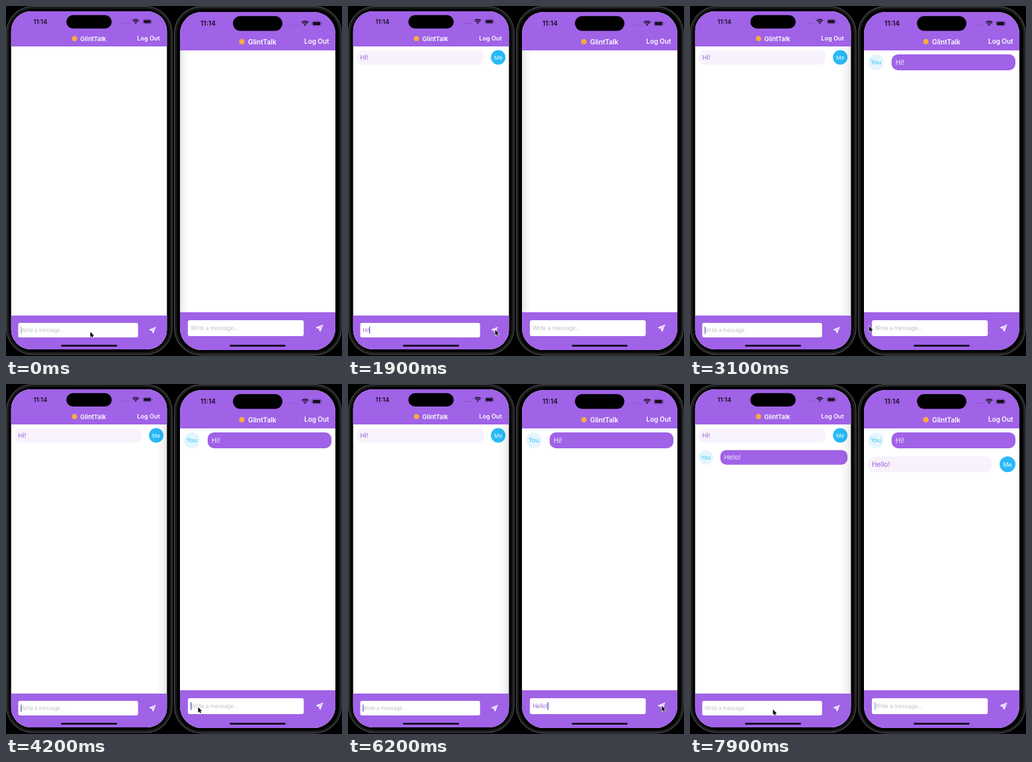
These frames come from a looping animation (508x528 px, 8000 ms). An HTML page with a canvas:

```html
<!DOCTYPE html>
<html lang="en">
<head>
<meta charset="utf-8">
<title>Two phones chatting</title>
<style>
  html, body { margin: 0; width: 100%; height: 100%; overflow: hidden; background: #000; }
  canvas { display: block; width: 508px; height: 528px; }
</style>
</head>
<body>
<canvas id="stage" width="508" height="528"></canvas>
<script>
const ctx = document.getElementById('stage').getContext('2d');
const LOOP = 8000, STEP = 100;
const FONT = 'Inter, "Open Sans", sans-serif';
const PURPLE = '#a062e7', INK = '#9a5edc', BLUE = '#29b9f7';
const APP_NAME = 'GlintTalk';

// Screen position in stage pixels; w is the screen width in points, s pixels per point.
const LEFT = {
  x: 7.5, y: 8, h: 510, w: 430, s: 0.549, head: 61, bar: 467, clockX: 52, statusY: 23.5, batteryX: 214,
  logoutGap: 20, frame: [0.7, 0.7, 250.3, 525]
};
const RIGHT = {
  x: 263, y: 9, h: 510, w: 393, s: 0.598, head: 67, bar: 462, clockX: 305.5, statusY: 26.5, batteryX: 470,
  logoutGap: 16, frame: [254.7, 1, 252.3, 525.5]
};

// Pointer stops: time, x, y
const POINTER = [
  [0, 127, 491], [800, 127, 491], [1100, 264, 477], [1200, 264, 478],
  [1600, 222, 488], [2300, 222, 488], [2600, 245, 485], [3000, 268, 482],
  [3500, 290, 487], [5400, 290, 487], [5600, 393, 482], [6000, 474, 485],
  [7000, 474, 485], [7300, 405, 488], [7700, 135, 491], [7900, 125, 490.5]
];

function box(x, y, w, h, r, fill) {
  ctx.beginPath();
  ctx.roundRect(x, y, w, h, r);
  ctx.fillStyle = fill;
  ctx.fill();
}

function disc(x, y, r, fill) {
  ctx.beginPath();
  ctx.arc(x, y, r, 0, 7);
  ctx.fillStyle = fill;
  ctx.fill();
}

function poly(points, fill) {
  ctx.beginPath();
  points.forEach(([x, y]) => ctx.lineTo(x, y));
  ctx.closePath();
  ctx.fillStyle = fill;
  ctx.fill();
}

function label(str, x, y, size, fill, align = 'left', weight = 400) {
  ctx.font = `${weight} ${size}px ${FONT}`;
  ctx.textAlign = align;
  ctx.textBaseline = 'alphabetic';
  ctx.fillStyle = fill;
  ctx.fillText(str, x, y + size * 0.36);
  return ctx.measureText(str).width;
}

function typed(str, times, t) {
  return str.slice(0, times.filter(k => t >= k).length);
}

// Opacity of a blinking caret
function blink(t, on) {
  const p = t % 1000;
  return p < on ? 1 : p < on + 100 ? 0.5 : 0;
}

function pointerAt(t) {
  const i = POINTER.findIndex(k => k[0] > t);
  if (i < 0) return POINTER[POINTER.length - 1].slice(1);
  const [t0, x0, y0] = POINTER[i - 1], [t1, x1, y1] = POINTER[i];
  const u = (t - t0) / (t1 - t0), e = u * u * (3 - 2 * u);
  return [x0 + (x1 - x0) * e, y0 + (y1 - y0) * e];
}

function drawFrame([x, y, w, h]) {
  box(x, y, w, h, 40, '#18181a');
  ctx.strokeStyle = '#454548';
  ctx.lineWidth = 1.3;
  ctx.stroke();
  box(x + 3, y + 3, w - 6, h - 6, 37, '#000');
  ctx.strokeStyle = '#29292c';
  ctx.lineWidth = 0.7;
  ctx.stroke();
}

function drawStatus(p) {
  const black = '#17101f';
  label('11:14', p.clockX, p.statusY + 0.3, 17 * p.s, black, 'center', 600);
  const k = p.s / 0.57, x = p.batteryX, y = p.statusY;
  for (let i = 0; i < 4; i++) disc(x - 38 + i * 3.4, y + 2.7, 0.8, '#7745b4');

  ctx.strokeStyle = black;
  ctx.lineWidth = 1.5 * k;
  for (const r of [6.7, 4.2]) {
    ctx.beginPath();
    ctx.arc(x - 17.8, y + 3.2, r * k, -Math.PI * 0.76, -Math.PI * 0.24);
    ctx.stroke();
  }
  ctx.beginPath();
  ctx.moveTo(x - 17.8, y + 3.4);
  ctx.arc(x - 17.8, y + 3.4, 2.4 * k, -Math.PI * 0.76, -Math.PI * 0.24);
  ctx.fillStyle = black;
  ctx.fill();

  ctx.beginPath();
  ctx.roundRect(x - 7 * k, y - 3.4 * k, 13 * k, 6.8 * k, 2);
  ctx.strokeStyle = '#64409a';
  ctx.lineWidth = 0.7;
  ctx.stroke();
  box(x - 5.9 * k, y - 2.4 * k, 10.8 * k, 4.8 * k, 1.2, black);
  box(x + 6.8 * k, y - 1.2, 0.8, 2.4, 0.4, '#64409a');
}

function drawMessage(m, row, w) {
  const y = 30 + row * 60.5;
  if (m.mine) {
    box(10, y - 20, w - 80, 40, 16, '#f7f2fb');
    label(m.text, 20, y, 17, INK);
    disc(w - 30, y, 20, BLUE);
    label('Me', w - 30, y + 0.5, 15, '#eefaff', 'center');
  } else {
    disc(30, y, 20, '#e4f5fd');
    label('You', 30, y + 0.5, 15, '#2cc1f6', 'center');
    box(70, y - 20, w - 80, 40, 16, PURPLE);
    label(m.text, 80, y, 17, '#f8f0ff');
  }
}

function drawComposer(w, text, caret) {
  box(20, 20, w - 100, 40, 5, '#fff');
  let end = 0;
  if (text) end = label(text, 27, 40, 14, INK);
  else label('Write a message...', 27, 40, 13.8, '#c1c0c4');
  if (caret) {
    ctx.globalAlpha = caret;
    box(27 + end, 30, 2, 20, 1, '#5142c4');
    ctx.globalAlpha = 1;
  }
  ctx.save();
  ctx.translate(w - 40, 40);
  poly([[9.5, -9.5], [-10, -1.5], [-2.6, 2.4], [1.8, 10]], '#f6eeff');
  ctx.beginPath();
  ctx.moveTo(-2.8, 2.8);
  ctx.lineTo(5.5, -5.5);
  ctx.strokeStyle = PURPLE;
  ctx.lineWidth = 1.4;
  ctx.stroke();
  ctx.restore();
}

// Soft shadow cast by the neighbouring window, from edge x towards x + dx
function drawShadow(p, x, dx) {
  const g = ctx.createLinearGradient(x, 0, x + dx, 0);
  g.addColorStop(0, 'rgba(0,0,0,0.11)');
  g.addColorStop(0.4, 'rgba(0,0,0,0.04)');
  g.addColorStop(1, 'rgba(0,0,0,0)');
  ctx.fillStyle = g;
  ctx.fillRect(Math.min(x, x + dx), p.head, Math.abs(dx), p.bar - p.head);
}

function inPoints(p, y, draw) {
  ctx.save();
  ctx.translate(p.x, y);
  ctx.scale(p.s, p.s);
  draw();
  ctx.restore();
}

function drawPhone(p, state) {
  const pw = p.w * p.s, mid = p.w / 2;
  drawFrame(p.frame);
  ctx.save();
  ctx.beginPath();
  ctx.roundRect(p.x, p.y, pw, p.h, 55 * p.s);
  ctx.clip();
  ctx.fillStyle = '#fff';
  ctx.fillRect(p.x, p.y, pw, p.h);
  ctx.fillStyle = PURPLE;
  ctx.fillRect(p.x, p.y, pw, p.head - p.y);
  ctx.fillRect(p.x, p.bar, pw, p.y + p.h - p.bar);

  inPoints(p, p.y, () => {
    box(mid - 62.5, 10.5, 125, 37, 18.5, '#000');
    disc(mid - 40, 75, 7, '#f8ad3c');
    label(APP_NAME, mid + 11.5, 75, 17, '#fff', 'center', 600);
    label('Log Out', p.w - p.logoutGap, 75, 16.5, '#fff', 'right', 600);
  });
  drawStatus(p);
  inPoints(p, p.head, () => state.messages.forEach((m, i) => drawMessage(m, i, p.w)));
  inPoints(p, p.bar, () => drawComposer(p.w, state.text, state.caret));
  box(p.x + pw * 0.32, 511, pw * 0.36, 2.9, 1.45, '#1c0f2c');
  if (state.shadow) drawShadow(p, state.shadow > 0 ? p.x : p.x + pw, state.shadow);
  ctx.restore();
}

function drawPointer(x, y) {
  const arrow = [[0, 0], [0, 8], [1.8, 6.5], [3, 9.2], [4.3, 8.6], [3.2, 6], [5.6, 5.8]];
  ctx.save();
  ctx.translate(x + 0.5, y + 0.5);
  poly(arrow, '#000');
  ctx.strokeStyle = '#fff';
  ctx.lineWidth = 1.2;
  ctx.lineJoin = 'round';
  ctx.stroke();
  poly(arrow, '#000');
  ctx.restore();
}

function messagesAt(t, isLeft, hiAt, helloAt) {
  const list = [];
  if (t >= hiAt) list.push({ text: 'Hi!', mine: isLeft });
  if (t >= helloAt) list.push({ text: 'Hello!', mine: !isLeft });
  return list;
}

function render(t) {
  ctx.fillStyle = '#000';
  ctx.fillRect(0, 0, 508, 528);
  const rightFocused = t >= 3000;
  drawPhone(LEFT, {
    messages: messagesAt(t, true, 1900, 7100),
    text: t < 2200 ? typed('Hi!', [500, 900, 1000], t) : '',
    caret: t < 500 ? 0.5 : t < 2200 ? 1 : blink(t, 700),
    shadow: rightFocused ? -17 : 0
  });
  drawPhone(RIGHT, {
    messages: messagesAt(t, false, 2200, 6500),
    text: t < 7200 ? typed('Hello!', [4700, 4900, 5000, 5100, 5200, 5300], t) : '',
    caret: t < 3600 ? 0 : t >= 4700 && t < 7200 ? 1 : t >= 7900 ? 0.5 : blink(t + 350, 600),
    shadow: rightFocused ? 0 : 14
  });
  drawPointer(...pointerAt(t));
}

const start = performance.now();
function tick() {
  const t = (performance.now() - start) % LOOP;
  render(Math.floor(t / STEP) * STEP);
  requestAnimationFrame(tick);
}
tick();
</script>
</body>
</html>
```
